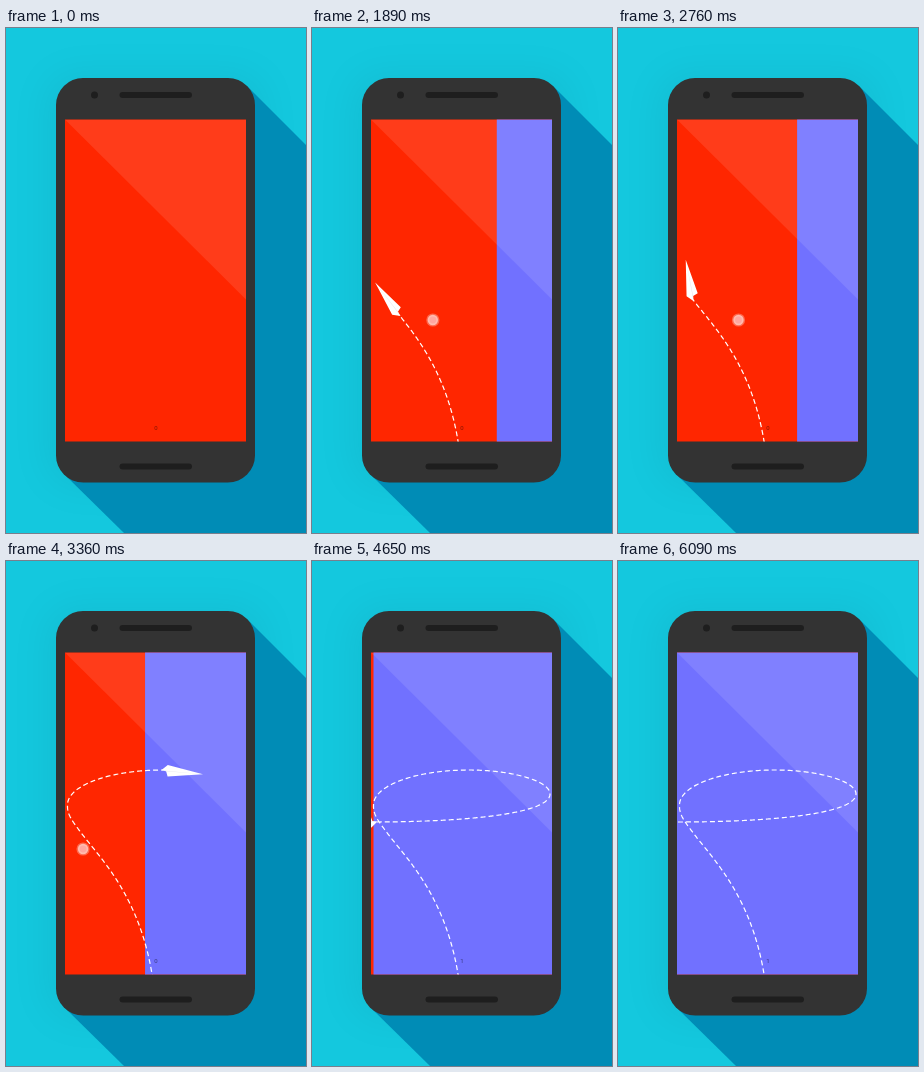
Recreate the animation shown at these times as an HTML page. Size 300 px wide and 505 px high, loop 6.12 s.

```html
<!DOCTYPE html>
<html lang="en">
<head>
<meta charset="utf-8">
<title>Paper plane pager</title>
<style>
  html, body { margin: 0; width: 100%; height: 100%; overflow: hidden; background: #14c8de; }
  svg { display: block; width: 300px; height: 505px; }
  text { font: 6px Roboto, sans-serif; text-anchor: middle; }
</style>
</head>
<body>
<svg viewBox="0 0 300 505">
  <defs>
    <clipPath id="screen"><rect x="59" y="91.5" width="181" height="322"/></clipPath>
    <filter id="soft" x="-50%" y="-50%" width="200%" height="200%"><feGaussianBlur stdDeviation="18"/></filter>
  </defs>

  <rect width="300" height="505" fill="#14c8de"/>
  <rect x="40" y="45" width="219" height="414" rx="30" fill="#00505f" opacity=".08" filter="url(#soft)"/>
  <path d="M241 58L300 117V505H118L58 446Z" fill="#008cb6"/>
  <rect x="50" y="50" width="199" height="404.5" rx="27" fill="#333"/>
  <g fill="#1e1e1e">
    <circle cx="88.5" cy="67" r="3.5"/>
    <rect x="113.5" y="64" width="72.5" height="6" rx="3"/>
    <rect x="113.5" y="435.5" width="72.5" height="6" rx="3"/>
  </g>

  <g clip-path="url(#screen)">
    <rect x="59" y="91" width="181" height="323" fill="#ff2600"/>
    <rect id="page" y="91" width="181" height="323" fill="#7171ff"/>
    <text id="label" x="150" y="401.5" fill="#000" fill-opacity=".5">0</text>
    <path id="trail" fill="none" stroke="#fff" stroke-width="1.2" stroke-dasharray="5 3"/>
    <g id="plane">
      <path d="M40 0L4-5.5L-2 .5L3 1L5 6Z" fill="#fff"/>
      <path d="M40 0L3 1L0 .5Z" fill="#e4e4ea"/>
    </g>
    <g id="finger" fill="#fff">
      <circle r="6.6" opacity=".3"/>
      <circle r="5.2" opacity=".55"/>
      <circle r="3.4" fill="#ff8f8f" opacity=".45"/>
    </g>
    <path d="M59 91.5H240V271.5Z" fill="#fff" opacity=".1"/>
  </g>
</svg>
<script>
  const LOOP = 6120, STEP = 30, START = 1500, RELEASE = 4160;
  const LEFT = 59, WIDTH = 181, TRAVEL = 630, LOOK_AHEAD = 26;
  const $ = id => document.getElementById(id);

  // Drag turning points: time, page edge x, finger x, finger y
  const drag = [
    [START, 240, 177, 292],
    [2170, 152, 87.5, 292],
    [2450, 149, 88, 292],
    [2950, 193, 135.5, 292],
    [3350, 139, 77, 288],
    [3860, 192, 128, 283],
    [RELEASE, 133, 71, 286.5]
  ];

  const route = document.createElementNS('http://www.w3.org/2000/svg', 'path');
  route.setAttribute('d', `M154.4 463.3L146 413C133 335 95 298 76 273
    C67 261 61 254 61.5 244C61.5 224 105 209 157 209C200 209 238 220 238 233
    C238 252 160 261 59 261L-40 261`);
  const at = s => route.getPointAtLength(s);
  const points = Array.from({ length: TRAVEL + 1 }, (_, s) => {
    const p = at(s);
    return p.x.toFixed(2) + ' ' + p.y.toFixed(2);
  });

  const swing = u => (1 - Math.cos(Math.PI * u)) / 2;
  const accelerate = u => u * u;

  function dragState(t) {
    const last = drag.length - 1;
    let i = 1;
    while (i < last && t > drag[i][0]) i++;
    const a = drag[i - 1], b = drag[i];
    const u = Math.min(1, Math.max(0, (t - a[0]) / (b[0] - a[0])));
    const e = (i === last ? accelerate : swing)(u);
    return a.slice(1).map((v, k) => v + (b[k + 1] - v) * e);
  }

  function draw(t) {
    let [edge, fx, fy] = dragState(t);
    if (t > RELEASE) {
      const left = Math.max(0, 1 - (t - RELEASE) / 996);
      edge = LEFT + (edge - LEFT) * left ** 5;
    }
    const s = TRAVEL * (LEFT + WIDTH - edge) / WIDTH;

    $('page').setAttribute('x', edge);
    $('label').textContent = t > RELEASE ? 1 : 0;

    const p = at(s);
    const d = 'M' + points.slice(0, Math.floor(s) + 1).join('L') + `L${p.x} ${p.y}`;
    $('trail').setAttribute('d', d);
    $('trail').setAttribute('stroke-dashoffset', -Math.max(0, t - START) * 0.02);

    const from = at(s + LOOK_AHEAD - 2), to = at(s + LOOK_AHEAD + 2);
    const angle = Math.atan2(to.y - from.y, to.x - from.x) * 180 / Math.PI;
    $('plane').setAttribute('transform', `translate(${p.x} ${p.y}) rotate(${angle})`);

    const fade = Math.max(0, 1 - Math.max(0, t - RELEASE) / 120);
    $('finger').setAttribute('transform', `translate(${fx} ${fy})`);
    $('finger').setAttribute('opacity', t < START ? 0 : fade);
  }

  const begin = performance.now();
  function tick() {
    const t = (performance.now() - begin) % LOOP;
    draw(Math.floor(t / STEP) * STEP);
    requestAnimationFrame(tick);
  }
  tick();
</script>
</body>
</html>
```
